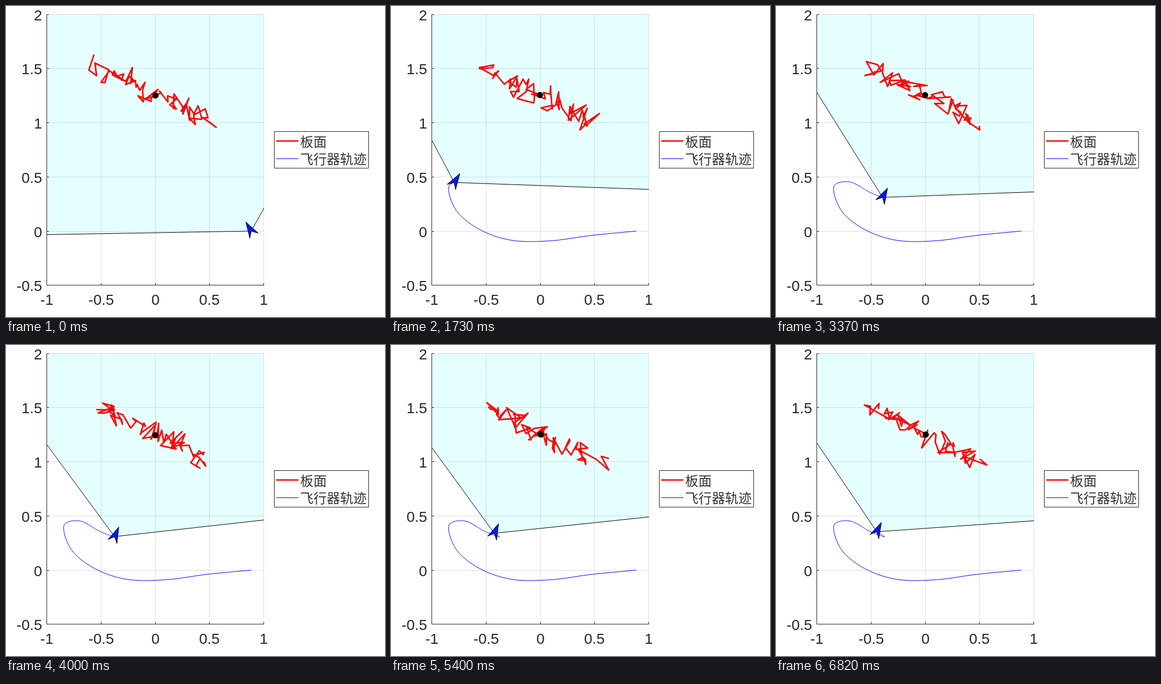
Write an HTML page with a canvas that moves like this. It is 683x561 px and loops after 6.9 s.

```html
<!DOCTYPE html>
<html lang="zh">
<head>
<meta charset="utf-8">
<style>
html, body { margin: 0; width: 100%; height: 100%; overflow: hidden; background: #fff; }
canvas { display: block; }
</style>
</head>
<body>
<canvas id="stage" width="683" height="561"></canvas>
<script>
const ctx = document.getElementById('stage').getContext('2d');
const LOOP = 6900, STEPS = 88, STEP_MS = LOOP / STEPS, PHASE = 22;
const LEFT = 73.5, RIGHT = 464.5, TOP = 15.5, BOTTOM = 503.5, UNIT = 195.56;
const INK = '#262626', FAINT = 'rgba(38,38,38,0.15)';
const center = { x: 269, y: 161.7 };

// Key points of the flight path, passed ever more slowly
const path = [
  [442, 406], [361.5, 413.8], [288, 423.5], [218.5, 422.8], [161, 403.8], [118.5, 370],
  [104.3, 326], [133.5, 317.5], [168.5, 335.8], [195.8, 346.2], [181.6, 336.9]
];
const SLOWDOWN = 22, LAST = path.length - 1;
const progress = step => LAST * (1 - Math.exp(-step / SLOWDOWN)) / (1 - Math.exp(-(STEPS - 1) / SLOWDOWN));

function slope(i, k) {
  const a = Math.max(i - 1, 0), b = Math.min(i + 1, LAST);
  return (path[b][k] - path[a][k]) / (b - a);
}

function positionAt(step) {
  const w = progress(step), i = Math.min(Math.floor(w), LAST - 1), u = w - i;
  return [0, 1].map(k =>
    path[i][k] * (1 + 2 * u) * (1 - u) ** 2 + path[i + 1][k] * u * u * (3 - 2 * u) +
    u * (1 - u) * (slope(i, k) * (1 - u) - slope(i + 1, k) * u));
}

// The heading turns towards the plate with a lag
const headings = [121 * Math.PI / 180];
for (let step = 0; step < STEPS - 1; step++) {
  const [x, y] = positionAt(step);
  const bearing = Math.atan2(y - center.y, center.x - x);
  headings.push(headings[step] + 0.14 * (bearing - headings[step]));
}

function seeded(seed) {
  let a = seed * 7919 + 17;
  return () => {
    a = (a + 0x6D2B79F5) | 0;
    let t = Math.imul(a ^ a >>> 15, 1 | a);
    t = t + Math.imul(t ^ t >>> 7, 61 | t) ^ t;
    return ((t ^ t >>> 14) >>> 0) / 4294967296;
  };
}

function trace(points) {
  ctx.beginPath();
  points.forEach(([x, y]) => ctx.lineTo(x, y));
}

function stroke(points, color, width = 1) {
  trace(points);
  ctx.strokeStyle = color;
  ctx.lineWidth = width;
  ctx.stroke();
}

function fill(points, color) {
  trace(points);
  ctx.fillStyle = color;
  ctx.fill();
}

function text(str, x, y, align, font, color = INK) {
  ctx.font = font;
  ctx.textAlign = align;
  ctx.fillStyle = color;
  ctx.fillText(str, x, y);
}

const xTick = v => Math.floor(73.5 + (v + 1) * UNIT) + 0.5;
const yTick = v => Math.min(BOTTOM, Math.floor(15 + (2 - v) * UNIT) + 0.5);
const xValues = [-1, -0.5, 0, 0.5, 1], yValues = [-0.5, 0, 0.5, 1, 1.5, 2];

function drawGrid() {
  xValues.forEach(v => stroke([[xTick(v), TOP], [xTick(v), BOTTOM]], FAINT));
  yValues.forEach(v => stroke([[LEFT, yTick(v)], [RIGHT, yTick(v)]], FAINT));
}

function drawAxes() {
  const font = '26.67px "Liberation Sans", Arial, sans-serif';
  stroke([[LEFT, TOP], [LEFT, BOTTOM], [RIGHT, BOTTOM]], INK);
  xValues.forEach(v => {
    stroke([[xTick(v), BOTTOM], [xTick(v), BOTTOM - 4]], INK);
    text(String(v), xTick(v), 539, 'center', font);
  });
  yValues.forEach(v => {
    stroke([[LEFT, yTick(v)], [LEFT + 4, yTick(v)]], INK);
    text(String(v), 65, yTick(v) + 10.5, 'right', font);
  });
}

function drawLegend() {
  const font = '300 24px "Noto Sans CJK SC", "Noto Sans CJK", sans-serif';
  const entries = [['板面', '#f00', 2.7], ['飞行器轨迹', '#00f', 1]];
  ctx.strokeStyle = INK;
  ctx.lineWidth = 1;
  ctx.strokeRect(483.5, 226.5, 170, 66);
  entries.forEach(([label, color, width], i) => {
    const y = 243.5 + 32 * i;
    stroke([[487, y], [527, y]], color, width);
    text(label, 530, 254 + 31 * i, 'left', font, '#333');
  });
}

function drawPlate(step) {
  const random = seeded(step + 1);
  const noise = () => (random() + random() + random() - 1.5) * 2;
  const count = 65, points = [];
  for (let i = 0; i < count; i++) {
    const u = 2 * i / (count - 1) - 1;
    points.push([center.x + 101 * u + 11 * noise(), center.y + 49 * u + 10 * noise()]);
  }
  stroke(points, '#f00', 2.7);
  ctx.beginPath();
  ctx.arc(center.x + 0.6 * noise(), center.y + 0.8 * noise(), 5.6, 0, 7);
  ctx.fillStyle = '#000';
  ctx.fill();
}

function draw(step) {
  const [x, y] = positionAt(step);
  const polar = (dist, degrees) => {
    const a = headings[step] + degrees * Math.PI / 180;
    return [x + dist * Math.cos(a), y - dist * Math.sin(a)];
  };
  ctx.fillStyle = '#fff';
  ctx.fillRect(0, 0, 683, 561);

  ctx.save();
  ctx.beginPath();
  ctx.rect(73, 15, 392, 489);
  ctx.clip();
  const view = [polar(2000, 60), [x, y], polar(2000, -60)];
  fill([...view, polar(2000, 0)], '#e5ffff');
  drawGrid();
  stroke(view, '#000');
  const trail = [];
  for (let s = 0; s <= step; s += 0.25) trail.push(positionAt(s));
  stroke(trail, '#00f');
  ctx.restore();

  drawAxes();
  drawPlate(step);
  const tip = polar(18.9, 0);
  const craft = [tip, polar(13.1, 137.5), [x, y], polar(13.1, -137.5), tip];
  fill(craft, '#0018ff');
  stroke(craft, '#000');
  drawLegend();
}

ctx.lineJoin = 'round';
const start = performance.now();
function tick() {
  const time = (performance.now() - start) % LOOP;
  draw(Math.min(STEPS - 1, Math.floor((time + PHASE) / STEP_MS)));
  requestAnimationFrame(tick);
}
tick();
</script>
</body>
</html>
```
